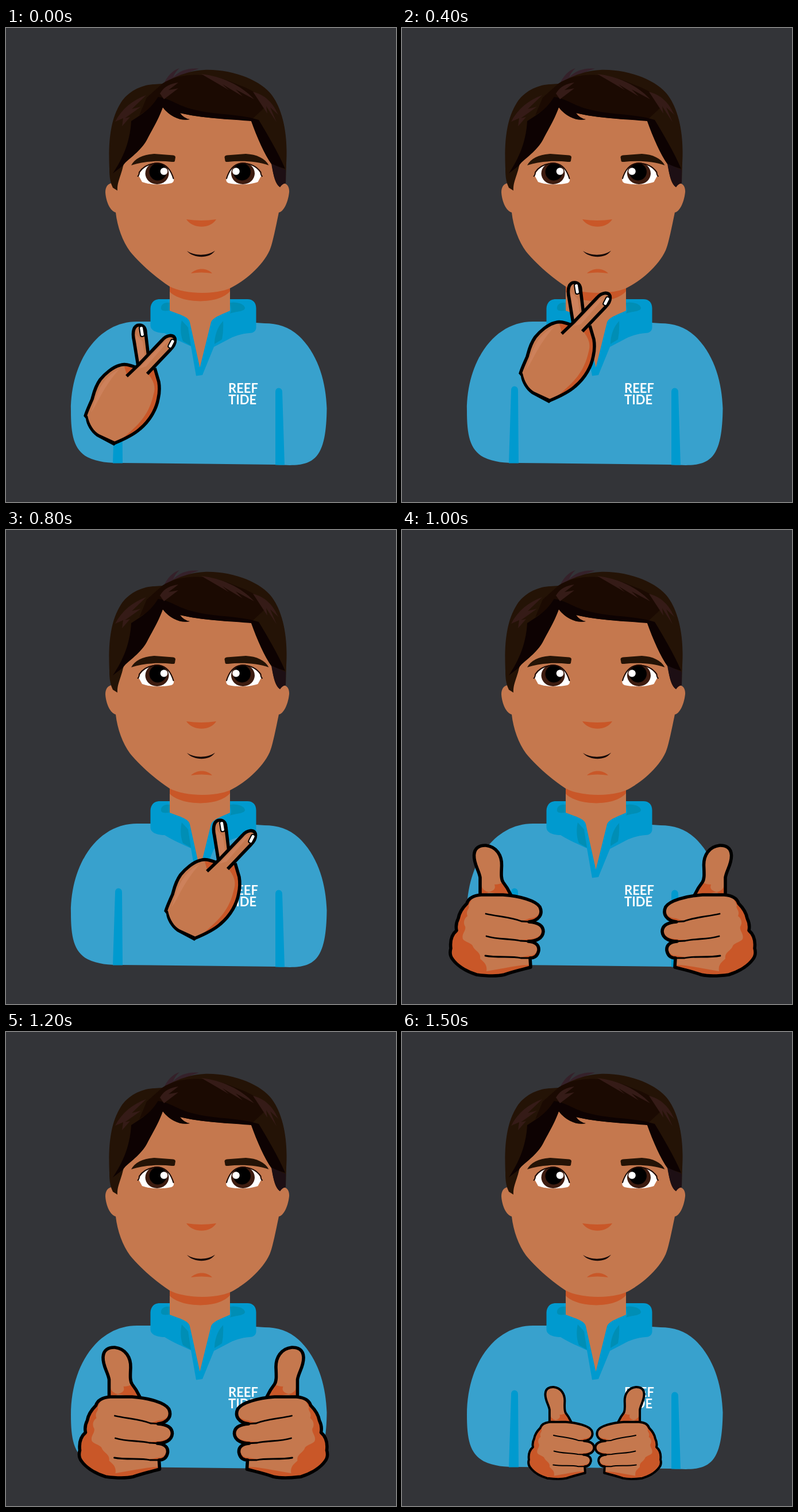
Animation of 679 by 825 pixels, one loop 1800 ms. Source, as an HTML page:

```html
<!DOCTYPE html>
<html lang="en">
<head>
<meta charset="utf-8">
<title>Waving avatar</title>
<style>
  html, body { margin: 0; width: 100%; height: 100%; overflow: hidden; background: #333438; }
  svg { display: block; width: 100%; height: 100%; }
  .skin { fill: #c5784e; }
  .shade { fill: #c95728; }
  .light { fill: #cd815b; }
  .shirt { fill: #38a1cd; }
  .trim { fill: #009acf; }
  .fold { fill: #008eb5; }
  .hair { fill: #241306; }
  .deep { fill: #0d0202; }
  .brown { fill: #1b0a02; }
  .gloss { fill: #351b17; }
  .wisp { fill: #35212a; }
  .ink { fill: none; stroke: #000; stroke-width: 5.6; stroke-linejoin: round; }
  .crease { fill: none; stroke: #000; stroke-width: 2.8; stroke-linecap: round; }
  .lash { fill: none; stroke: #1c0a05; stroke-width: 2; stroke-linecap: round; }
  .nail { fill: #fff; stroke: #000; stroke-width: 2; }
  text { font: 700 22px Lato, sans-serif; fill: #fff; }
</style>
</head>
<body>
<svg viewBox="0 0 679 825">
  <defs>
    <g id="eye">
      <path fill="#fff" d="M231 257C236 243 248 235.500 264 235.500C279 236 287 247 292 262Q293 268 288 270C272 273.500 250 273 237 268Z"/>
      <ellipse cx="263" cy="253" rx="20.500" ry="19" fill="#3d1c10"/>
      <circle cx="264.500" cy="250.500" r="15" fill="#000"/>
      <circle cx="275" cy="249.500" r="6.300" fill="#fff"/>
      <path class="lash" d="M229.500 258Q232 256 232 251C239 241 250 235.500 264 235.500C279 236 287 247 291.500 262"/>
      <path class="hair" d="M218 239C224 227 239 220 258 219L291 221.500Q295 222 295 225L294 231Q294 233.500 289 233C264 230.500 238 232 218 239Z"/>
    </g>

    <path id="fist" d="M113 650C116 640 125 636 138 635H176C205 637 233 645 240 656C246 669 238 680 221 682C236 683 246 688 246 699C245 711 233 716 220 716C232 717 239 722 238 732C236 742 230 745 223 745L224 761C205 766 192 769 178 774C165 777 145 776 130 774C110 768 95 757 88 747C84 742 83 735 85 728C83 712 88 703 95 697C93 688 95 682 98 676C100 664 108 655 113 650Z"/>

    <g id="thumb">
      <path class="skin" d="M136 638V605C134 592 124 582 125 566C126 553 135 548 146 549C165 551 174 567 173.500 584C173 597 172 607 176 613L190 638Z"/>
      <path class="shade" d="M138 618Q140 628 151 630Q165 627 161 617Q170 617 176 613L189 636H137Z"/>
      <path class="skin" d="M145 637C148 625 162 633 178 637Z"/>
      <path class="ink" d="M136 636V605C134 592 125 582 125.500 566C126 553 135 548.500 146 549C165 551 174 567 173.500 584C173 597 172 607 176 613L183 623L190 636"/>
      <use href="#fist" class="shade"/>
      <path class="skin" d="M122 642C126 638 131 637 138 637H176C205 639 230 646 237 656C243 666 237 675 222 676L210 680L222 684C236 686 243 690 243 699C243 707 233 711 222 712L205 714L223 718C232 720 236 724 235 731C234 737 229 741 220 741L205 744L222 746V757C200 757 174 764 147 768C149 756 142 752 136 746C138 736 128 733 124 726C122 718 110 718 106 712C103 703 112 698 110 690C106 684 108 676 114 672C110 661 119 660 116 653Z"/>
      <use href="#fist" class="ink"/>
      <path class="crease" d="M146 668C168 673 190 674 208 681L224 682M147 707C166 713 190 711 206 715L224 716M145 741C167 745 190 741 207 745H225"/>
    </g>
  </defs>

  <rect width="679" height="825" fill="#333438"/>

  <!-- shirt -->
  <path class="shirt" d="M228 511C160 511 113 580 113 666C113 708 118 734 142 747C160 756 180 757 200 757L470 760C502 762 523 762 538 748C554 733 558 700 558.500 662C557 618 545 573 515 541C496 521 475 514 450 514L435 513L252 511Z"/>
  <path class="trim" d="M190 631Q190 623.500 196 623.500Q202 624 202 631L203 757.500H186ZM469 634Q469 626.500 475 626.500Q481 627 481 634L485 760.500H469Z"/>
  <text x="387" y="635">REEF</text>
  <text x="387" y="655">TIDE</text>

  <!-- neck and collar -->
  <path class="skin" d="M285 440H390V495L357 515L338 594L319 515L285 495Z"/>
  <path class="shade" d="M285 448C312 464 364 464 390 452V458C370 482 305 480 285 459Z"/>
  <path class="trim" d="M268 472H285V492C300 498 318 502 320 512L337.500 591L357 512C360 503 378 498 390 492V472H420C430 472 435.500 478 435.500 488V522C435 528 430 531 424 531C410 532 397 536 385 543L362 555L342 604L331 605.500L322 554C310 548 290 540 276 531C262 531 251.500 526 251.500 518V488C252 478 258 472 268 472Z"/>
  <path class="fold" d="M285 478C275 477 269 482 270 489C272 494 280 492 285 492ZM390 478C401 476 415 480 416 487C416 494 400 493 390 497C394 489 390 485 390 478ZM306 509C303 521 304 535 308 545L322 553L317 521ZM378 510C367 521 363 538 363 550L376 542Q379 527 378 510Z"/>

  <!-- head -->
  <path class="skin" d="M190 272C181 267 173 274 173 286C174 303 182 319 191 321C194 347 203 371 216 389C234 411 262 435 285 450C312 464 364 464 390 453C415 441 446 415 459 387C464 376 470 345 475 321C483 320 491 304 493 286C494 274 486 266 477 274L470 150L340 110L230 140Z"/>
  <use href="#eye"/>
  <use href="#eye" transform="translate(675.500) scale(-1 1)"/>
  <path class="shade" d="M314 333Q340 337 366 333C356 350 325 350 314 333ZM322 427C332 417 350 417 359 427Q340 424 322 427Z"/>
  <path fill="#160a08" d="M315 388C329 397 350 397 364 387.500C354 402.500 326 401 315 388Z"/>

  <!-- hair -->
  <path class="wisp" d="M274 98C281 84 289 74 302 70Q294 77 291 86C302 74 318 69 336 71C318 76 306 82 296 97Z"/>
  <path class="hair" d="M194 283L186 278C181 268 180 258 180 245C178 200 181 160 200 130C213 110 236 99 258 98L272 97C285 90 310 75 345 73C395 71 445 92 463 117C482 143 491 185 488 235L487 270Q481 271 477 277C470 272 466 262 463 238C450 220 437 190 427 162L420 160C390 159 340 157 303 148Q309 157 320 159C300 163 282 150 273 138C263 165 252 180 245 195C232 218 209 228 204 240C200 258 193 269 194 283Z"/>
  <path class="brown" d="M272 97C300 78 347 77 385 91C420 105 442 111 454 135L427 160C370 154 310 151 274 123L232 152L245 121Z"/>
  <path class="deep" d="M264 121Q270 127 273 138C263 165 252 180 245 195C232 218 209 230 203 240L186 253C204 226 216 198 218 162C235 151 252 141 264 121ZM264 120C285 122 300 136 327 142C355 150 390 149 425 156L440 160C455 185 473 215 486 245L463 238C450 220 437 190 427 162C390 159 340 157 303 148Q309 157 320 159C300 163 282 150 273 138Z"/>
  <path fill="#1d0f14" d="M462 236L487 247V270Q481 271 477 277C470 272 466 260 462 236Z"/>
  <path class="gloss" d="M190 163C202 140 220 126 244 117L219 141L235 137L207 157L216 155L202 171L204 157ZM268 114C276 101 286 97 300 95L283 108L300 105L275 124ZM340 80C375 84 409 99 432 124L400 107L412 119L377 98L388 108ZM430 111C449 116 463 127 474 151L460 138L471 164L453 136L455 149Z"/>

  <!-- crossed fingers -->
  <g id="peace">
    <path class="skin" d="M229 590L223 545C219 528 223 517 232 517C240 517 243 523 243 530L248 575L240 592Z"/>
    <path class="light" d="M226 533L238 546L242 574L231 585Z"/>
    <path class="ink" d="M230 588L223 545C219 528 223 517 232 517C240 517 243 523 243 530L248 572"/>
    <path class="skin" d="M224 592C214 586 206 584 198 587C186 590 172 602 164 612C154 626 152 640 150 646C144 660 140 668 138 676C142 690 150 703 160 709L188 724C205 716 222 708 233 698C252 682 262 662 265 645C268 632 267 622 266 616L259 592Z"/>
    <path class="light" d="M197 594C176 604 164 621 156 645L148 669C160 654 167 628 197 594Z"/>
    <path class="shade" d="M206 589L229 590L211 606ZM246 600L259 592L266 616C264 651 255 681 231 699L202 715C232 690 249 673 257 637C262 622 254 610 246 600Z"/>
    <path class="ink" d="M227 591C214 586 206 584 198 587C186 590 172 602 164 612C154 626 152 640 150 646C144 660 140 668 138 676M188 723C205 716 222 708 233 698C252 682 262 662 265 645C268 632 267 622 266 616L259 592"/>
    <path d="M135 675L142 675C145 690 153 702 162 707L188 719L193 722L188 727L158 711C147 703 140 690 139 680Z"/>
    <path class="skin" d="M210 607L272 543C280 534 292 533 295 541C297 548 292 555 286 561L246 602L226 612Z"/>
    <path class="light" d="M231 593L276 546L285 542L244 589Z"/>
    <path class="ink" d="M210 606L231 586L272 543C280 534 291 533 294 540C296 548 292 554 286 560L246 602"/>
    <rect class="nail" x="-3.500" y="-9" width="7" height="18" rx="3" transform="translate(236.500 528) rotate(-9)"/>
    <rect class="nail" x="-3.500" y="-8" width="7" height="16" rx="3" transform="translate(288 549.500) rotate(27)"/>
  </g>

  <g id="thumbs">
    <use id="left" href="#thumb"/>
    <use id="right" href="#thumb"/>
  </g>
</svg>
<script>
  const LOOP = 1800, STEP = 100, THUMBS_START = 1000;

  // Offsets of the crossed fingers, one per step; the last one holds.
  const arc = [[0, 0], [16, -26], [32, -48], [50, -65], [68, -74],
               [88, -71], [107, -60], [124, -38], [140, -12]];

  // Thumbs: left x, mirrored right x, y, scale.
  const near = [43.5, 643.5, 0, 1], close = [161, 510, 231, 0.705];
  const mix = k => near.map((v, i) => v + (close[i] - v) * k);
  const approach = [[0, 699, 0, 1], [21.5, 671, 0, 1], near, mix(1 / 3), mix(2 / 3), close];

  const el = id => document.getElementById(id);
  const peace = el('peace'), thumbs = el('thumbs'), left = el('left'), right = el('right');
  const show = (node, on) => node.setAttribute('visibility', on ? 'visible' : 'hidden');
  const at = (table, ms) => table[Math.min(Math.floor(ms / STEP), table.length - 1)];

  function draw(now) {
    const t = now % LOOP, thumbsUp = t >= THUMBS_START;
    show(peace, !thumbsUp);
    show(thumbs, thumbsUp);
    if (thumbsUp) {
      const [lx, rx, y, s] = at(approach, t - THUMBS_START);
      left.setAttribute('transform', `translate(${lx} ${y}) scale(${s})`);
      right.setAttribute('transform', `translate(${rx} ${y}) scale(${-s} ${s})`);
    } else {
      peace.setAttribute('transform', `translate(${at(arc, t)})`);
    }
  }

  const start = performance.now();
  function tick() {
    draw(performance.now() - start);
    requestAnimationFrame(tick);
  }
  tick();
</script>
</body>
</html>
```
